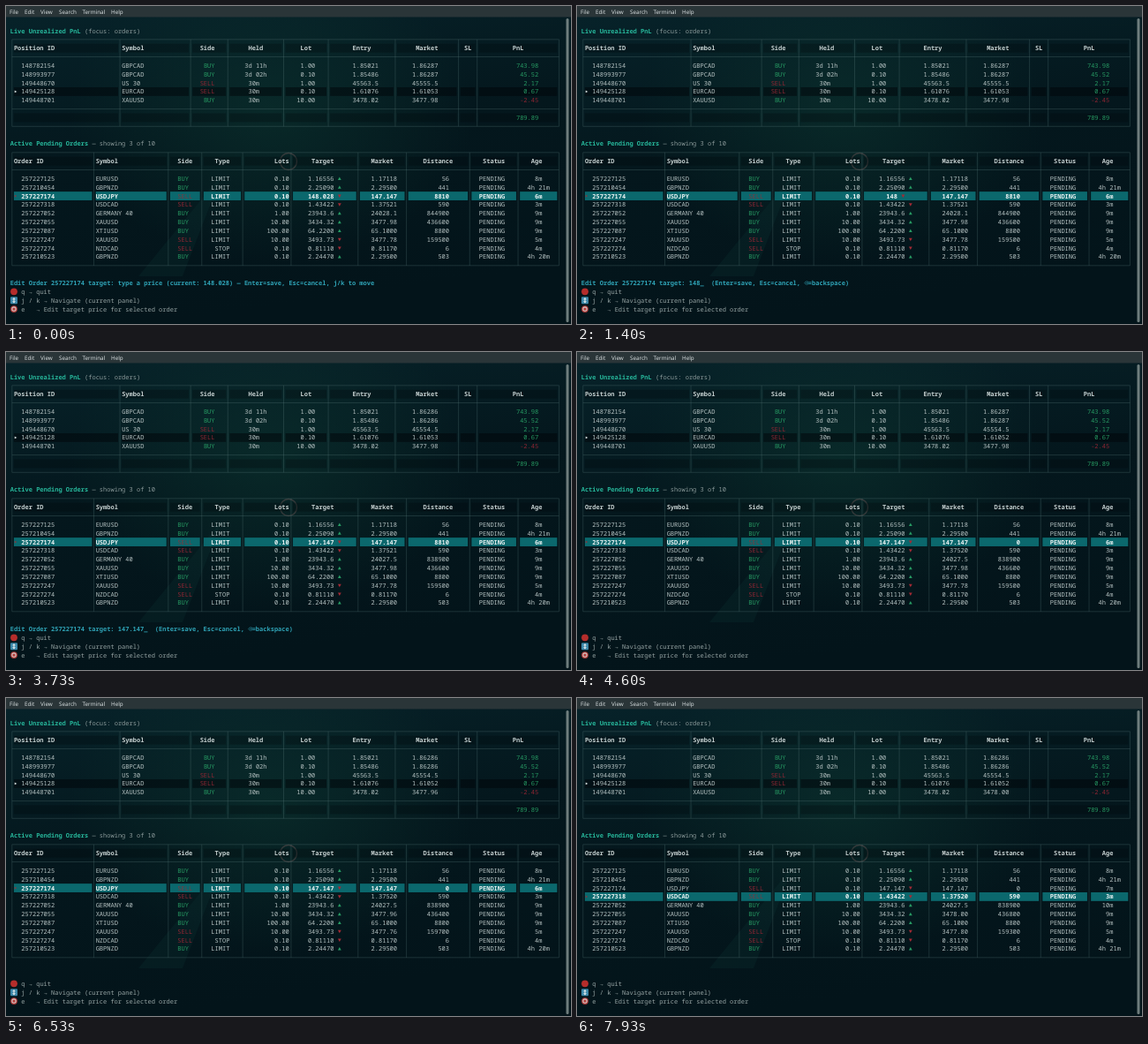
An HTML page that plays this animation: 640x360 px, repeating every 8000 ms.

```html
<!DOCTYPE html>
<html lang="en">
<head>
<meta charset="utf-8">
<title>Trading terminal</title>
<style>
  html, body { margin: 0; width: 100%; height: 100%; overflow: hidden; background: #04151a; }
  svg { display: block; width: 100vw; height: 100vh; }
  text { font: 7.025px "Noto Sans Mono", "DejaVu Sans Mono", monospace; white-space: pre; text-rendering: geometricPrecision; fill: #b7c3c3; }
  .menu { font: 6.3px "Noto Sans", sans-serif; fill: #d5dcdd; }
  .b { font-weight: 700; }
  .head { font-weight: 700; fill: #c6d0d0; }
  .title { font-weight: 700; fill: #27b79b; }
  .dim { fill: #8c9b9b; }
  .hint { fill: #98a5a5; }
  .prompt { font-weight: 700; fill: #2fa3b6; }
  .up { fill: #279a63; }
  .down { fill: #8f2633; }
  .sel { font-weight: 700; fill: #e9f3f3; }
  .sel.down { font-weight: 400; fill: #7d3a40; }
</style>
</head>
<body>
<svg viewBox="0 0 640 360" preserveAspectRatio="none">
  <defs>
    <linearGradient id="sky" x1="0" y1="0" x2=".25" y2="1">
      <stop offset="0" stop-color="#07232a"/>
      <stop offset=".5" stop-color="#04171d"/>
      <stop offset="1" stop-color="#03141a"/>
    </linearGradient>
    <radialGradient id="glow">
      <stop offset="0" stop-color="#0d3a33" stop-opacity=".5"/>
      <stop offset="1" stop-color="#0d3a33" stop-opacity="0"/>
    </radialGradient>
  </defs>
  <rect width="640" height="360" fill="url(#sky)"/>
  <ellipse cx="300" cy="120" rx="230" ry="170" fill="url(#glow)"/>
  <path d="M150 306L245 190L200 306Z" fill="#0c3436" opacity=".25"/>
  <circle cx="320" cy="176" r="9.5" fill="none" stroke="#574b4b" stroke-width="1.3" opacity=".6"/>
  <rect width="640" height="12.5" fill="#2a3538"/>
  <rect x="634.5" y="14" width="3" height="344" rx="1.5" fill="#82908f" opacity=".85"/>
  <g id="fixed"></g>
  <g id="live"></g>
</svg>
<script>
const LOOP = 8000, CW = 4.215, RH = 9.845;
const X = c => 4.7 + CW * c;
const Y = r => 28 + RH * r;

const text = (c, r, s, cls = '') =>
  `<text x="${X(c).toFixed(2)}" y="${(Y(r) + 2.5).toFixed(2)}" class="${cls}">${s}</text>`;
const right = (c, r, s, cls) => text(c - s.length, r, s, cls);
const center = (c, r, s, cls) => text(c - Math.ceil(s.length / 2), r, s, cls);
const shape = (d, fill) => `<path d="${d}" fill="${fill}"/>`;

// Cells lie between the border columns
const band = (cols, r, fill) => cols.slice(1).map((c, i) => {
  const x = X(cols[i] + 1);
  return `<rect x="${x}" y="${Y(r) - RH / 2}" width="${X(c) - x}" height="${RH}" fill="${fill}"/>`;
}).join('');

function grid(cols, rules) {
  const mid = c => X(c + .5), last = cols[cols.length - 1];
  const v = cols.map(c => `M${mid(c)} ${Y(rules[0])}V${Y(rules[rules.length - 1])}`);
  const h = rules.map(r => `M${mid(cols[0])} ${Y(r)}H${mid(last)}`);
  return `<path d="${v.join('') + h.join('')}" fill="none" stroke="#5b7b7c" stroke-opacity=".42" stroke-width=".7"/>`;
}

const heads = (r, list) => list.map(([c, s]) => text(c, r, s, 'head')).join('');

const posCols = [0, 29, 48, 58, 73, 85, 103, 120, 125, 147];
const ordCols = [0, 22, 42, 51, 62, 75, 93, 106, 123, 136, 147];

const positions = [
  ['148782154', 'GBPCAD', 'BUY', '3d 11h', '1.00', '1.85021', 'gbpcad', '743.98'],
  ['148993977', 'GBPCAD', 'BUY', '3d 02h', '0.10', '1.85486', 'gbpcad', '45.52'],
  ['149448670', 'US 30', 'SELL', '30m', '1.00', '45563.5', 'us30', '2.17'],
  ['149425128', 'EURCAD', 'SELL', '30m', '0.10', '1.61076', 'eurcad', '0.67'],
  ['149448701', 'XAUUSD', 'BUY', '30m', '10.00', '3478.02', 'gold', '-2.45']
];

// Values starting with a lowercase letter are looked up in the live quotes
const orders = [
  ['257227125', 'EURUSD', 'BUY', 'LIMIT', '0.10', '1.16556', '1.17118', '56', '8m'],
  ['257210454', 'GBPNZD', 'BUY', 'LIMIT', '0.10', '2.25090', '2.29500', '441', '4h 21m'],
  ['257227174', 'USDJPY', 'SELL', 'LIMIT', '0.10', 'target', '147.147', 'gap', 'ageA'],
  ['257227318', 'USDCAD', 'SELL', 'LIMIT', '0.10', '1.43422', 'usdcad', '590', '3m'],
  ['257227052', 'GERMANY 40', 'BUY', 'LIMIT', '1.00', '23943.6', 'ger', 'gerGap', 'ageB'],
  ['257227055', 'XAUUSD', 'BUY', 'LIMIT', '10.00', '3434.32', 'gold', 'goldGap', '9m'],
  ['257227087', 'XTIUSD', 'BUY', 'LIMIT', '100.00', '64.2200', '65.1000', '8800', '9m'],
  ['257227247', 'XAUUSD', 'SELL', 'LIMIT', '10.00', '3493.73', 'bid', 'bidGap', '5m'],
  ['257227274', 'NZDCAD', 'SELL', 'STOP', '0.10', '0.81110', '0.81170', '6', '4m'],
  ['257210523', 'GBPNZD', 'BUY', 'LIMIT', '0.10', '2.24470', '2.29500', '503', 'ageC']
];

const ENTER = 4270, MOVE = 7730;
const typing = [[470, '1'], [800, '14'], [1130, '148'], [1870, '14'], [2270, '147'],
  [2800, '147.'], [3070, '147.1'], [3270, '147.14'], [3530, '147.147']];

// Step value: first, then each [time, value] once reached
const step = (t, first, ...steps) => steps.reduce((v, [at, next]) => t >= at ? next : v, first);

function quotes(t) {
  const typed = step(t, '', ...typing);
  return {
    typed,
    target: typed || '148.028',
    gap: step(t, '8810', [ENTER, '0']),
    gbpcad: step(t, '1.86287', [1600, '1.86286'], [4470, '1.86287'], [5330, '1.86286']),
    us30: step(t, '45555.5', [2130, '45554.5']),
    eurcad: step(t, '1.61053', [ENTER, '1.61052']),
    usdcad: step(t, '1.37521', [ENTER, '1.37520']),
    ger: step(t, '24028.1', [2130, '24027.5']),
    gerGap: step(t, '844900', [2130, '838900']),
    gold: step(t, '3477.98', [6130, '3477.96'], [7130, '3478.00']),
    goldGap: step(t, '436600', [6130, '436400'], [7130, '436800']),
    bid: step(t, '3477.78', [6130, '3477.76'], [7130, '3477.80']),
    bidGap: step(t, '159500', [6130, '159700'], [7130, '159300']),
    ageA: step(t, '6m', [7130, '7m']),
    ageB: step(t, '9m', [7130, '10m']),
    ageC: step(t, '4h 20m', [7130, '4h 21m'])
  };
}

const marker = (r, fill) => shape(`M${X(1.2)} ${Y(r) - 1.4}l2.6 1.4l-2.6 1.4z`, fill);

function position(p, i, q) {
  const r = 4 + i, [id, sym, side, held, lot, entry, key, pnl] = p;
  return text(3, r, id) + text(30, r, sym) +
    right(55, r, side, side === 'BUY' ? 'up' : 'down') +
    text(held.length > 3 ? 63 : 64, r, held) + right(82, r, lot) +
    text(92, r, entry) + right(115, r, q[key]) +
    right(142, r, pnl, pnl[0] === '-' ? 'down' : 'up');
}

function order(o, i, q, picked) {
  const r = 17 + i, buy = o[2] === 'BUY', on = i === picked, cls = on ? 'sel' : '';
  const [id, sym, side, type, lots, target, market, gap, age] = o.map(v => q[v] || v);
  const tc = 80 + Math.floor((7 - target.length) / 2);
  const x = X(tc + target.length + 1) + .3, y = Y(r), s = buy ? -1 : 1;
  return (on ? band(ordCols, r, '#0b686d') + marker(r, '#7d3a40') : '') +
    text(3, r, id, cls) + text(23, r, sym, cls) +
    text(45, r, side, cls + (buy ? ' up' : ' down')) +
    right(59, r, type, cls) + right(75, r, lots, cls) + text(tc, r, target, cls) +
    shape(`M${x} ${y - 1.6 * s}h3.8l-1.9 ${3.5 * s}z`, buy ? '#279a63' : '#a32a35') +
    text(97, r, market, cls) + right(118, r, gap, cls) +
    text(126, r, 'PENDING', cls) +
    center(142, r, age, cls);
}

function prompt(t, typed) {
  if (t >= ENTER) return '';
  const lead = 'Edit Order 257227174 target: ';
  if (!typed) return text(0, 29, lead + 'type a price (current: 148.028) — Enter=save, Esc=cancel, j/k to move', 'prompt');
  const s = lead + typed + '_  (Enter=save, Esc=cancel, ';
  const x = X(s.length), y = Y(29);
  return text(0, 29, s, 'prompt') +
    `<path d="M${x} ${y}l1.5 -1.6h2.5v3.2h-2.5zM${x + 1.7} ${y - .7}l1.4 1.4m0 -1.4l-1.4 1.4" fill="none" stroke="#2fa3b6" stroke-width=".5"/>` +
    text(s.length + 1, 29, '=backspace)', 'prompt');
}

function fixed() {
  const shade = 'rgba(0,8,10,.3)';
  const menu = [[4, 'File'], [21, 'Edit'], [39, 'View'], [60, 'Search'], [86.5, 'Terminal'], [119, 'Help']]
    .map(([x, s]) => `<text x="${x}" y="8.7" class="menu">${s}</text>`).join('');
  const hints = [['q', 5, 'quit'], ['j / k', 9, 'Navigate (current panel)'], ['e', 7, 'Edit target price for selected order']]
    .map(([key, c, s], i) => text(3, 30 + i, key, 'hint') + text(c, 30 + i, '→', 'hint') + text(c + 2, 30 + i, s, 'hint')).join('');
  const dot = (r, rad, fill) => `<circle cx="9" cy="${Y(r)}" r="${rad}" fill="${fill}"/>`;
  const icons = dot(30, 3.9, '#b52d2b') +
    `<rect x="5" y="${Y(31) - 4}" width="8" height="8" rx="1" fill="#3b87a8"/>` +
    shape(`M9 ${Y(31) - 3.2}l2 2.2h-1.4v2h1.4l-2 2.2l-2 -2.2h1.4v-2h-1.4z`, '#dce6e8') +
    dot(32, 3.9, '#b23a38') + dot(32, 2.7, '#d5c9c7') + dot(32, 1.6, '#b23a38');
  return menu +
    band(posCols, 2, shade) + band(posCols, 7, 'rgba(0,4,8,.5)') + band(posCols, 10, shade) +
    band(ordCols, 15, shade) +
    grid(posCols, [1, 3, 9, 11]) + grid(ordCols, [14, 16, 27]) +
    text(0, 0, 'Live Unrealized PnL', 'title') + text(20, 0, '(focus: orders)', 'dim') +
    heads(2, [[1, 'Position ID'], [30, 'Symbol'], [51, 'Side'], [64, 'Held'], [78, 'Lot'],
      [92, 'Entry'], [109, 'Market'], [122, 'SL'], [135, 'PnL']]) +
    marker(7, '#d5dede') + right(142, 10, '789.89', 'up') +
    text(0, 13, 'Active Pending Orders', 'title') +
    heads(15, [[1, 'Order ID'], [23, 'Symbol'], [45, 'Side'], [55, 'Type'], [71, 'Lots'],
      [81, 'Target'], [97, 'Market'], [111, 'Distance'], [127, 'Status'], [140, 'Age']]) +
    hints + icons;
}

function live(t) {
  const q = quotes(t), picked = step(t, 2, [MOVE, 3]);
  return text(22, 13, `— showing ${picked + 1} of 10`, 'dim') +
    positions.map((p, i) => position(p, i, q)).join('') +
    orders.map((o, i) => order(o, i, q, picked)).join('') +
    prompt(t, q.typed);
}

document.getElementById('fixed').innerHTML = fixed();
const layer = document.getElementById('live');
const start = performance.now();
let shown = '';

function draw() {
  const next = live((performance.now() - start) % LOOP);
  if (next !== shown) layer.innerHTML = shown = next;
  requestAnimationFrame(draw);
}
draw();
</script>
</body>
</html>
```
